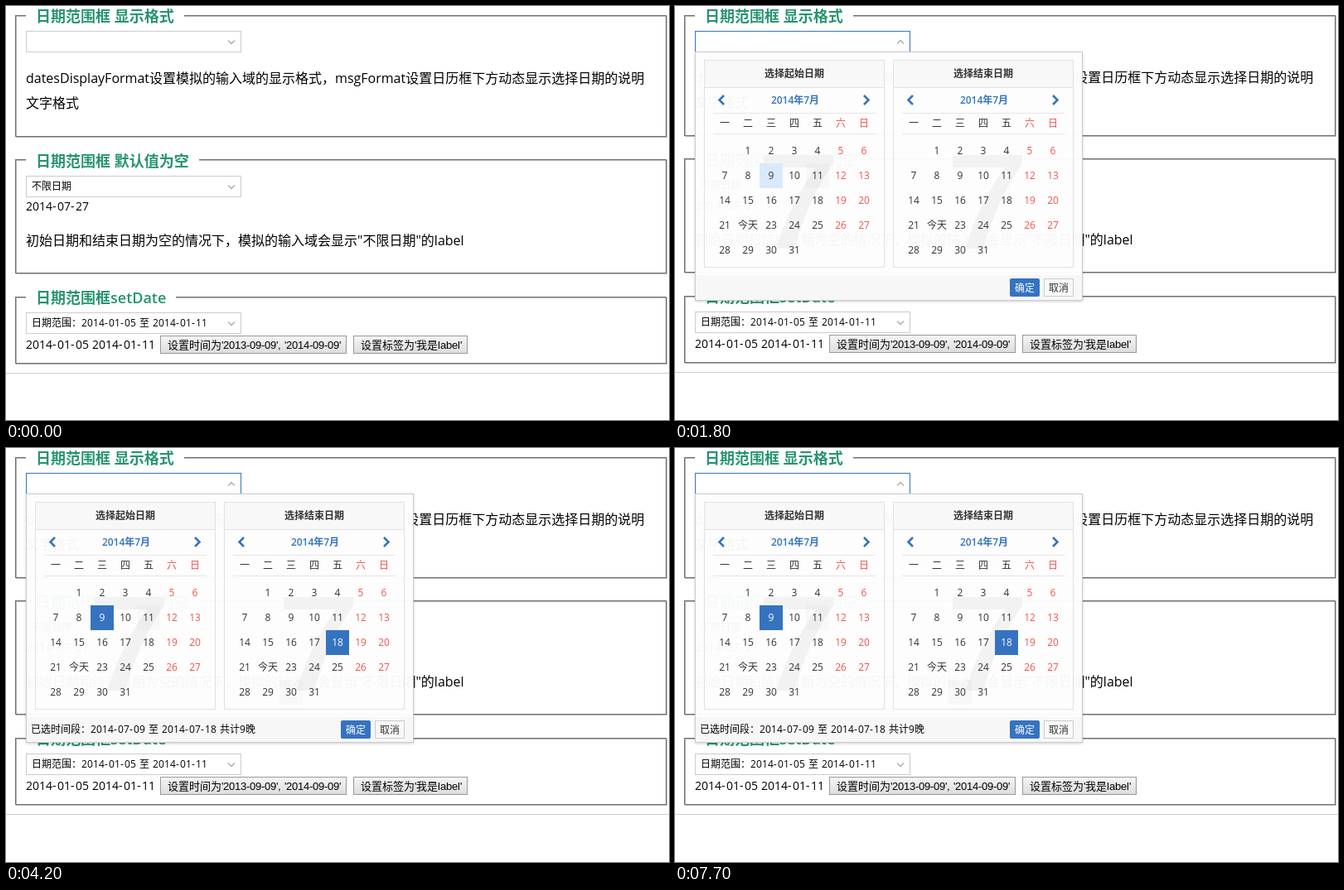
An HTML page with a canvas that plays this animation: 800 px wide and 500 px high, repeating every 8000 ms.

```html
<!DOCTYPE html>
<html lang="zh-CN">
<head>
<meta charset="utf-8">
<title>日期范围框</title>
<style>
  html, body { margin: 0; width: 100%; height: 100%; overflow: hidden; background: #fff; }
  canvas { display: block; }
</style>
</head>
<body>
<canvas id="stage" width="800" height="500"></canvas>
<script>
const ctx = document.getElementById('stage').getContext('2d');
const LOOP = 8000;
const UI = '"Open Sans", "Noto Sans CJK SC", "Noto Sans CJK", sans-serif';
const CONTROL = '"Liberation Sans", "Noto Sans CJK SC", "Noto Sans CJK", sans-serif';
const BLUE = '#3573c0', RED = '#f2544e', GREEN = '#269470', INK = '#333';

function rect(x, y, w, h, color) {
  ctx.fillStyle = color;
  ctx.fillRect(x, y, w, h);
}

function frame(x, y, w, h, color) {
  ctx.strokeStyle = color;
  ctx.lineWidth = 1;
  ctx.strokeRect(x + 0.5, y + 0.5, w - 1, h - 1);
}

function setFont(size, color, weight = 400, family = UI) {
  ctx.font = `${weight} ${size}px ${family}`;
  ctx.fillStyle = color;
}

// y is the vertical centre of the line
const baseline = (y, size) => Math.round(y + size * 0.37);

function text(str, x, y, size, color, { weight = 400, align = 'left' } = {}) {
  setFont(size, color, weight);
  ctx.textAlign = align;
  ctx.fillText(str, x, baseline(y, size));
}

// Whole-pixel advances, as in small hinted screen type
function pixelText(str, x, y, size, color, family = UI) {
  setFont(size, color, 400, family);
  ctx.textAlign = 'left';
  for (const ch of str) {
    const wide = family === UI && (ch === '-' || ch === ' ') ? 1.23 : 1;
    ctx.fillText(ch, x, baseline(y, size));
    x += Math.round(ctx.measureText(ch).width * wide);
  }
}

function chevron(points, color, width) {
  ctx.strokeStyle = color;
  ctx.lineWidth = width;
  ctx.beginPath();
  points.forEach(([x, y]) => ctx.lineTo(x, y));
  ctx.stroke();
}

function fieldset(top, bottom, title, gapEnd, titleY) {
  frame(12, top + 1, 786, bottom - top + 1, '#b4b4b4');
  frame(11, top, 786, bottom - top + 1, '#707070');
  rect(24, top - 1, gapEnd - 24, 4, '#fff');
  text(title, 36, titleY, 18, GREEN, { weight: 600 });
}

function input(y, label, border = '#ccc', open = false) {
  rect(24, y, 260, 26, '#fff');
  frame(24, y, 260, 26, border);
  pixelText(label, 31, y + 13, 12, '#000');
  const tip = open ? -2 : 2;
  chevron([[268, y + 13.5 - tip], [272, y + 13.5 + tip], [276, y + 13.5 - tip]], '#aaa', 1.3);
}

function button(x, y, w, label) {
  const shade = ctx.createLinearGradient(0, y, 0, y + 22);
  shade.addColorStop(0, '#f6f6f6');
  shade.addColorStop(1, '#dcdcdc');
  rect(x, y, w, 22, shade);
  frame(x, y, w, 22, '#999');
  pixelText(label, x + 9, y + 11, 13, '#000', CONTROL);
}

function page(t, open) {
  const s = open ? 1 : 0;
  rect(0, 0, 800, 500, '#fff');

  fieldset(11, 157 - s, '日期范围框 显示格式', 215, 12);
  input(30, '', open ? BLUE : t >= 400 ? '#a0b3d6' : '#ccc', open);

  ctx.save();
  ctx.translate(0, -s);
  text('datesDisplayFormat设置模拟的输入域的显示格式，msgFormat设置日历框下方动态显示选择日期的说明', 24, 87, 16, '#000');
  text('文字格式', 24, 117, 16, '#000');

  fieldset(185, 322, '日期范围框 默认值为空', 233, 187);
  input(205, '不限日期');
  pixelText('2014-07-27', 24, 242, 14, '#000');
  text('初始日期和结束日期为空的情况下，模拟的输入域会显示"不限日期"的label', 24, 283, 16, '#000');

  fieldset(351, 431, '日期范围框setDate', 205, 352);
  input(370, '日期范围：2014-01-05 至 2014-01-11');
  pixelText('2014-01-05 2014-01-11', 24, 409, 14, '#000');
  button(186, 398, 225, "设置时间为'2013-09-09', '2014-09-09'");
  button(419, 398, 138, "设置标签为'我是label'");
  rect(0, 443, 800, 1, '#ccc');
  ctx.restore();
}

function calendar(x, title, { hover, selected, trail = [] }) {
  ctx.save();
  ctx.translate(x, 65);
  rect(0, 0, 218, 33, '#f8f8f8');
  frame(0, 0, 218, 251, '#e1e1e1');
  rect(0, 33, 218, 1, '#e1e1e1');
  text(title, 109, 16.5, 12, INK, { weight: 600, align: 'center' });
  text('2014年7月', 110, 48.5, 12, BLUE, { weight: 600, align: 'center' });
  chevron([[24, 43], [18.5, 48.5], [24, 54]], BLUE, 2.6);
  chevron([[193, 43], [198.5, 48.5], [193, 54]], BLUE, 2.6);
  rect(11, 64, 196, 1, '#e5e5e5');
  rect(11, 89, 196, 1, '#e5e5e5');

  // Month watermark
  ctx.fillStyle = '#f2f2f2';
  ctx.beginPath();
  ctx.moveTo(72, 115);
  ctx.lineTo(156, 115);
  ctx.lineTo(156, 125);
  ctx.quadraticCurveTo(124, 172, 109, 228);
  ctx.lineTo(87, 228);
  ctx.quadraticCurveTo(104, 174, 135, 130);
  ctx.lineTo(72, 130);
  ctx.fill();

  const inkFor = col => col > 4 ? RED : INK;
  [...'一二三四五六日'].forEach((name, col) =>
    text(name, 25 + 28 * col, 76.5, 12, inkFor(col), { align: 'center' }));

  for (let day = 1; day <= 31; day++) {
    const col = day % 7, row = Math.floor(day / 7);
    const left = 11 + 28 * col, top = 95 + 30 * row;
    const fill = day === selected ? BLUE
      : day === hover ? '#d9e9fd'
      : trail.includes(day) ? 'rgba(0,0,0,0.02)' : null;
    if (fill) rect(left, top, 28, 30, fill);
    text(day === 22 ? '今天' : String(day), left + 14, top + 14.5, 12,
      day === selected ? '#fff' : inkFor(col), { align: 'center' });
  }
  ctx.restore();
}

function message(t) {
  const str = '已选时间段：2014-07-09 至 2014-07-18 共计9晚';
  pixelText(str, 30, 340, 12, '#000');
  if (t < 6100 || t >= 7700) return;
  const end = t < 6200 ? 202 : t < 6300 ? 254 : 301;
  ctx.save();
  ctx.beginPath();
  ctx.rect(195, 331, end - 195, 17);
  ctx.clip();
  rect(195, 331, end - 195, 17, '#3399ff');
  pixelText(str, 30, 340, 12, '#fff');
  ctx.restore();
}

function leftState(t) {
  const hover = t < 1500 ? 0 : t < 1600 ? 11 : t < 1800 ? 10 : t < 2300 ? 9
    : t >= 2700 && t < 2800 ? 11 : 0;
  return { hover, selected: t >= 2300 ? 9 : 0, trail: t >= 1600 ? [11] : [] };
}

function rightState(t) {
  const hover = t >= 2800 && t < 3700 ? 18 : t >= 4100 && t < 4200 ? 30 : 0;
  return { hover, selected: t >= 3700 ? 18 : 0, trail: t >= 4200 ? [30] : [] };
}

function popup(t) {
  ctx.save();
  ctx.shadowColor = 'rgba(0,0,0,0.2)';
  ctx.shadowBlur = 3;
  ctx.shadowOffsetY = 1;
  rect(24, 55, 468, 301, 'rgba(255,255,255,0.96)');
  ctx.restore();
  rect(25, 325, 466, 30, 'rgba(247,247,247,0.9)');
  frame(24, 55, 468, 301, '#ccc');

  calendar(35, '选择起始日期', leftState(t));
  calendar(263, '选择结束日期', rightState(t));

  if (t >= 3700) message(t);
  ctx.fillStyle = BLUE;
  ctx.beginPath();
  ctx.roundRect(404, 329, 36, 22, 2);
  ctx.fill();
  text('确定', 422, 341, 12, '#fff', { align: 'center' });
  rect(445, 329, 36, 22, '#f9f9f9');
  frame(445, 329, 36, 22, '#ccc');
  text('取消', 463, 341, 12, INK, { align: 'center' });
}

const start = performance.now();

function render() {
  const t = (performance.now() - start) % LOOP;
  const open = t >= 1000;
  page(t, open);
  if (open) popup(t);
  requestAnimationFrame(render);
}

render();
</script>
</body>
</html>
```
